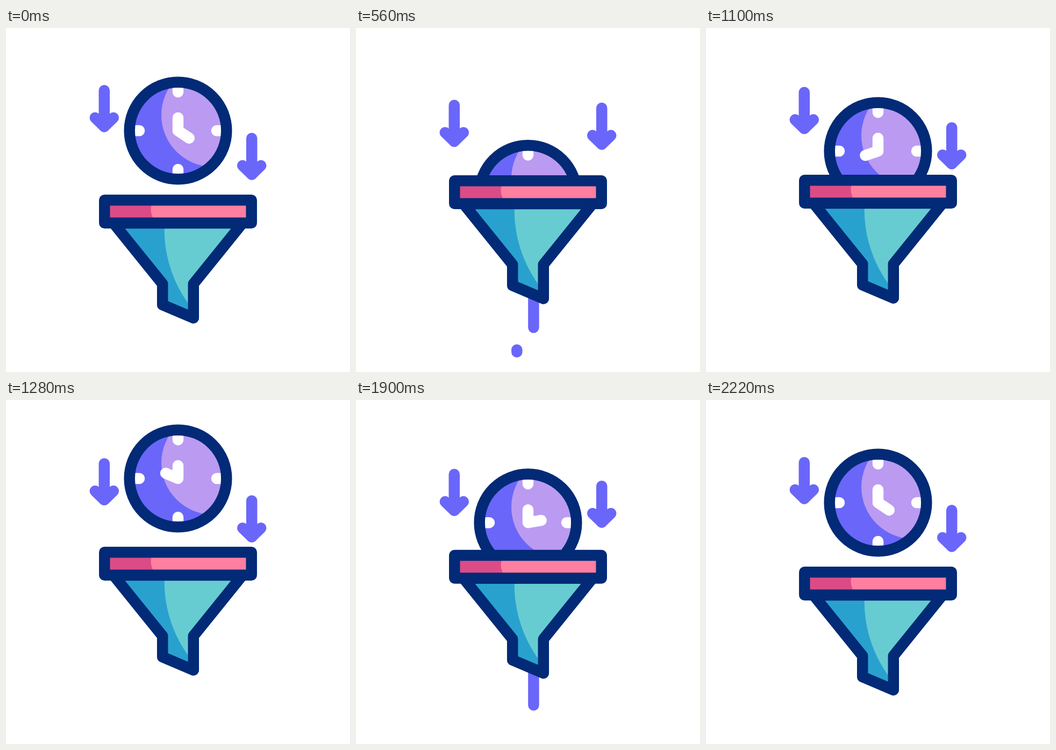
Animation of 640 by 640 pixels, one loop 2.4 s. Source, as an HTML page with a canvas:

```html
<!DOCTYPE html>
<html lang="en">
<head>
<meta charset="utf-8">
<title>Time funnel</title>
<style>
html, body { margin: 0; width: 100%; height: 100%; overflow: hidden; background: #fff; }
canvas { display: block; width: 100vw; height: 100vh; }
</style>
</head>
<body>
<canvas id="stage" width="640" height="640"></canvas>
<script>
const ctx = document.getElementById('stage').getContext('2d');
const LOOP = 2400, START = 200, LENGTH = 2000, STEP = 20;
const BEAT = 400, SWING = 500;
const MID = 320, LINE = 20.5, TAU = Math.PI * 2;
const NAVY = '#022a76', VIOLET = '#6a66f9', LILAC = '#bb9af2', WHITE = '#fff';
const PINK = '#ff7fa0', ROSE = '#db4c87', TEAL = '#67ccd1', BLUE = '#29a1ce';

const clamp = v => Math.min(1, Math.max(0, v));
const smooth = v => v * v * (3 - 2 * v);
const ease = (t, from, span = BEAT) => smooth(clamp((t - from) / span));

// Bezier easing with handles at x1 and x2, flat at both ends.
function bezier(x, x1, x2) {
  let lo = 0, hi = 1;
  for (let i = 0; i < 24; i++) {
    const s = (lo + hi) / 2, r = 1 - s;
    const at = 3 * r * r * s * x1 + 3 * r * s * s * x2 + s * s * s;
    if (at < x) lo = s; else hi = s;
  }
  return smooth((lo + hi) / 2);
}

// Swings 0 to 1 and back, twice per loop.
function swing(t) {
  const phase = (t / SWING) % 2;
  return smooth(1 - Math.abs(1 - phase));
}

// The clock sinks, pops out, drops again and settles.
function clockY(t) {
  return 191 + 121 * ease(t, 0) - 166 * ease(t, 2 * BEAT, BEAT / 2)
    + 89 * ease(t, 3 * BEAT) - 44 * ease(t, 4 * BEAT);
}

const funnelShift = t => -37 * (ease(t, 0) - ease(t, 4 * BEAT));
const leftTop = t => 106 + 34 * swing(t);

function rightTop(t) {
  const low = Math.abs(t - LENGTH / 2) < SWING ? 181 : 195;
  return low + (125.5 - low) * swing(t);
}

function path(points, closed) {
  ctx.beginPath();
  points.forEach(([x, y]) => ctx.lineTo(x, y));
  if (closed) ctx.closePath();
}

function stroke(points, color, closed) {
  path(points, closed);
  ctx.strokeStyle = color;
  ctx.stroke();
}

function disc(x, y, r, color) {
  ctx.beginPath();
  ctx.arc(x, y, r, 0, TAU);
  ctx.fillStyle = color;
  ctx.fill();
}

function box(x, y, w, h, color) {
  ctx.fillStyle = color;
  ctx.fillRect(x, y, w, h);
}

function arrow(x, top) {
  const tip = top + 77.5;
  stroke([[x, top + LINE / 2], [x, tip]], VIOLET);
  stroke([[x - 17, tip - 16.5], [x, tip], [x + 17, tip - 16.5]], VIOLET);
}

// A drip grows from its top, then shrinks toward its bottom.
function drip(x, bottom, len, grow, shrink) {
  if (grow <= shrink) return;
  const top = bottom - len;
  stroke([[x, top + len * shrink], [x, top + len * grow]], VIOLET);
}

function drips(t) {
  const half = BEAT / 2;
  drip(299.3, 602.7, 39, ease(t, 0, half), ease(t, half, half));
  drip(330.4, 567.7, 100, ease(t, half, half), ease(t, BEAT));
}

function clock(y, turn) {
  ctx.save();
  ctx.translate(MID, y);

  ctx.save();
  ctx.beginPath();
  ctx.arc(0, 0, 88, 0, TAU);
  ctx.clip();
  box(-90, -90, 180, 180, VIOLET);
  disc(65.3, -29, 96.3, LILAC);
  for (let i = 0; i < 4; i++) {
    ctx.rotate(TAU / 4);
    stroke([[72, 0], [90, 0]], WHITE);
  }
  ctx.restore();

  const a = (123.7 / 360 + turn) * TAU;
  stroke([[0, -24], [0, 0], [25 * Math.sin(a), -25 * Math.cos(a)]], WHITE);
  ctx.beginPath();
  ctx.arc(0, 0, 90.3, 0, TAU);
  ctx.strokeStyle = NAVY;
  ctx.stroke();
  ctx.restore();
}

function funnel(shift) {
  const rim = 120, neck = 28.8, rimY = 363, neckY = 476;
  const cone = [
    [MID - rim, rimY], [MID - neck, neckY], [MID - neck, 515],
    [MID + neck, 539.5], [MID + neck, neckY], [MID + rim, rimY]
  ];
  const band = [MID - 136.7, 320.2, 273.4, 42.5];
  ctx.save();
  ctx.translate(0, shift);

  ctx.save();
  path(cone, true);
  ctx.clip();
  box(180, 350, 280, 200, BLUE);
  disc(530.7, 375, 236, TEAL);
  ctx.restore();
  stroke(cone, NAVY, true);

  ctx.save();
  ctx.beginPath();
  ctx.rect(...band);
  ctx.clip();
  box(...band, ROSE);
  disc(301.5, 338, 32, PINK);
  box(290, 320, 167, 43, PINK);
  ctx.restore();
  ctx.strokeStyle = NAVY;
  ctx.strokeRect(...band);
  ctx.restore();
}

function draw(now) {
  const shown = Math.floor((now % LOOP) / STEP) * STEP;
  const t = Math.min(LENGTH, Math.max(0, shown - START));
  box(0, 0, 640, 640, WHITE);
  ctx.lineWidth = LINE;
  ctx.lineCap = ctx.lineJoin = 'round';

  drips(t);
  drips(t - 3 * BEAT);
  arrow(182.8, leftTop(t));
  arrow(457.2, rightTop(t));
  clock(clockY(t), bezier(t / LENGTH, 1 / 3, 5 / 6));
  funnel(funnelShift(t));
}

const begin = performance.now();
function tick() {
  draw(performance.now() - begin);
  requestAnimationFrame(tick);
}
tick();
</script>
</body>
</html>
```
